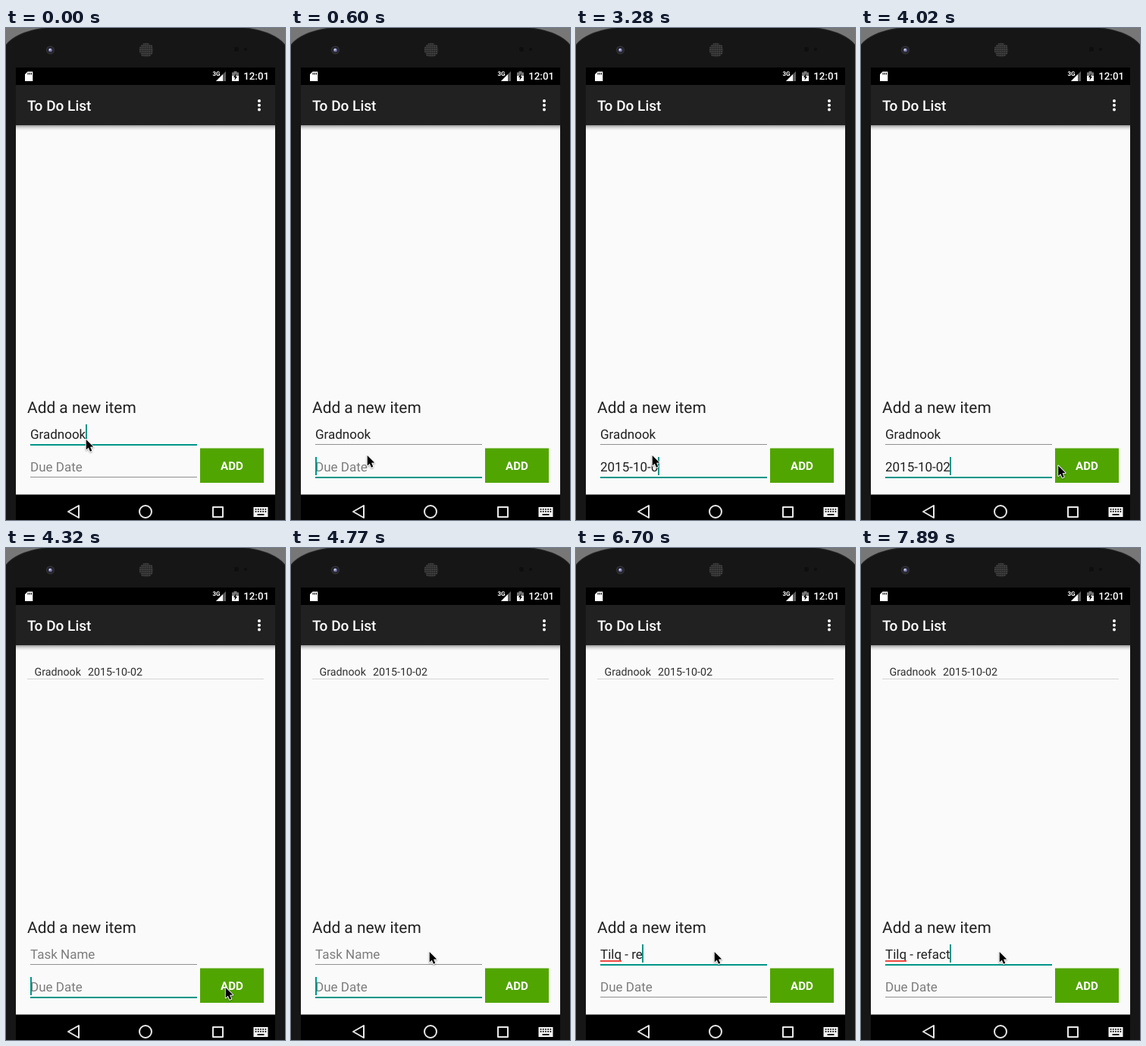
These frames come from a looping animation (368x648 px, 8000 ms). An HTML page with a canvas:

```html
<!DOCTYPE html>
<html lang="en">
<head>
<meta charset="utf-8">
<title>To Do List</title>
<style>
  html, body { margin: 0; width: 100%; height: 100%; overflow: hidden; background: #141414; }
  canvas { display: block; }
</style>
</head>
<body>
<canvas id="stage" width="368" height="648"></canvas>
<script>
const ctx = document.getElementById('stage').getContext('2d');
const LOOP = 8000, TICK = 148.7;
const TEAL = '#009688', INK = '#212121', HINT = '#7d7d7d';

// Events, in ticks
const FOCUS_DUE = 4, ADDED = 29, FOCUS_TASK = 33, SPELLCHECK = 41;

// Typing rhythm: every bar is one tick, empty slots are pauses
const TASK = 'Gradnook';
const DUE = { start: 7, keys: '2||0|1||5||-||1|0|-||||0|2' };
const NEXT_TASK = { start: 35, keys: 'T||i|l|q|| |-| ||re|||f||a||c|t' };

// Pointer glides: first and last tick, end point
const HOME = { x: 105, y: 541 };
const GLIDES = [
  { from: 0, to: 3, x: 100, y: 562 },
  { from: 24, to: 28, x: 289, y: 578 },
  { from: 29, to: 32, x: 182, y: 531 }
];

const typed = ({ start, keys }, tick) =>
  keys.split('|').slice(0, Math.max(0, tick - start + 1)).join('');

const ease = u => u * u * (3 - 2 * u);

function pointerAt(tick) {
  return GLIDES.reduce((p, g) => {
    const u = ease(Math.min(1, Math.max(0, (tick - g.from) / (g.to - g.from))));
    return { x: p.x + (g.x - p.x) * u, y: p.y + (g.y - p.y) * u };
  }, HOME);
}

function rect(x, y, w, h, color) {
  ctx.fillStyle = color;
  ctx.fillRect(x, y, w, h);
}

function disc(x, y, r, color) {
  ctx.fillStyle = color;
  ctx.beginPath();
  ctx.arc(x, y, r, 0, Math.PI * 2);
  ctx.fill();
}

function shape(path, fill, stroke, width = 2) {
  const p = new Path2D(path);
  if (stroke) {
    ctx.strokeStyle = stroke;
    ctx.lineWidth = width;
    ctx.lineJoin = 'round';
    ctx.stroke(p);
  }
  if (fill) {
    ctx.fillStyle = fill;
    ctx.fill(p);
  }
}

function label(text, x, y, size, color, weight = 400, align = 'left') {
  ctx.font = `${weight} ${size}px Roboto, sans-serif`;
  ctx.textAlign = align;
  ctx.fillStyle = color;
  ctx.fillText(text, x, y);
}

function drawBody() {
  rect(0, 0, 368, 648, '#777');
  shape('M0 650V23Q14 5 54 0H314Q354 5 368 23V650Z', '#161616', '#2b2b2b');

  disc(58.5, 29, 5.5, '#333336');
  disc(58.5, 29, 4, '#1c1c2a');
  disc(58.5, 29, 2.6, '#6a6a98');
  disc(58, 28.5, 1.3, '#d4d4e2');

  disc(185, 29, 9.5, '#242424');
  for (let y = -8; y <= 8; y += 2.5) {
    for (let x = -8; x <= 8; x += 2.5) {
      if (Math.hypot(x, y) < 9) disc(185 + x, 29 + y, 0.8, '#5c5c5c');
    }
  }
  disc(304, 28, 3, '#0e0e0e');
  disc(316, 28, 2, '#0e0e0e');
}

function drawStatusBar() {
  rect(13, 52, 342, 23, '#000');
  shape('M28.5 57.5H35.3V70H25V61Z', '#fff');
  for (let i = 0; i < 3; i++) rect(28.5 + i * 2.2, 59, 1.1, 2.5, '#000');

  shape('M290 57V70H277Z', '#5c5c5c');
  shape('M286 61V70H277Z', '#fff');
  label('3G', 272.5, 63, 8, '#fff', 700);

  rect(300.5, 57, 4, 2, '#777');
  rect(298, 58.5, 9, 5, '#777');
  rect(298, 63, 9, 7, '#fff');
  shape('M303.5 60L300 65H302L301.5 69L305 64H303Z', '#000');
  label('12:01', 347, 68, 13.3, '#fff', 500, 'right');
}

function drawToolbar() {
  rect(13, 75, 342, 53, INK);
  const shadow = ctx.createLinearGradient(0, 128, 0, 135);
  shadow.addColorStop(0, 'rgba(0,0,0,.38)');
  shadow.addColorStop(0.5, 'rgba(0,0,0,.12)');
  shadow.addColorStop(1, 'rgba(0,0,0,0)');
  rect(13, 128, 342, 7, shadow);
  label('To Do List', 28, 109, 19, '#fff', 500);
  for (let i = -1; i <= 1; i++) disc(334, 101.7 + i * 5.7, 2, '#fff');
}

function drawNavBar() {
  rect(13, 614.5, 342, 34, '#000');
  shape('M82 637L96 629V645Z', null, '#e8e8e8');
  shape('M192 637A8 8 0 1 1 176 637A8 8 0 1 1 192 637Z', null, '#e8e8e8');
  shape('M273 631H286V644H273Z', null, '#e8e8e8');

  rect(326.5, 631, 19, 13, '#f2f2f2');
  for (let i = 0; i < 10; i++) {
    rect(328.7 + (i % 5) * 3.2, 633 + Math.floor(i / 5) * 3, 1.7, 1.7, '#000');
  }
  rect(331.5, 640, 9, 1.7, '#000');
}

function drawField(text, hint, baseline, focused) {
  label(text || hint, 32, baseline, 17, text ? INK : HINT);
  if (focused) {
    const caretX = Math.floor(31.9 + ctx.measureText(text).width);
    rect(32, baseline + 7, 220, 2, TEAL);
    rect(Math.max(32, caretX), baseline - 19, 2, 24, TEAL);
  } else {
    rect(32, baseline + 7, 220, 1, '#919191');
  }
}

function drawPointer(tick) {
  const { x, y } = pointerAt(tick);
  const arrow = 'M0 0V13.5L3.1 10.7L5.3 15.8L7.6 14.8L5.4 9.8L9.5 9.6Z';
  ctx.save();
  ctx.translate(x + 0.7, y + 1);
  ctx.shadowColor = 'rgba(0,0,0,.35)';
  ctx.shadowBlur = 2;
  ctx.shadowOffsetY = 1;
  shape(arrow, null, '#fff', 1.8);
  ctx.shadowColor = 'transparent';
  shape(arrow, '#000');
  ctx.restore();
}

function draw(time) {
  const tick = Math.floor(time / TICK);
  const added = tick >= ADDED;
  const onDue = tick >= FOCUS_DUE && tick < FOCUS_TASK;
  const task = added ? typed(NEXT_TASK, tick) : TASK;
  const due = added ? '' : typed(DUE, tick);

  drawBody();
  rect(13, 128, 342, 487, '#fafafa');
  drawStatusBar();
  drawToolbar();

  if (added) {
    label(TASK, 37.5, 168, 14.25, '#303030');
    label(typed(DUE, tick), 108, 168, 14.25, '#303030');
    rect(28, 172, 312, 1, '#d6d6d6');
  }

  label('Add a new item', 28, 507, 20.9, INK);
  drawField(task, 'Task Name', 541, !onDue);
  drawField(due, 'Due Date', 584, onDue);
  if (tick >= SPELLCHECK) rect(32, 543, 28, 2, '#ee4b42');

  rect(256, 553.5, 84, 45.5, '#51a500');
  label('ADD', 298, 582, 15.2, '#fff', 700, 'center');

  drawNavBar();
  drawPointer(tick);
}

ctx.textRendering = 'geometricPrecision';
const start = performance.now();
function frame() {
  draw((performance.now() - start) % LOOP);
  requestAnimationFrame(frame);
}
frame();
</script>
</body>
</html>
```
